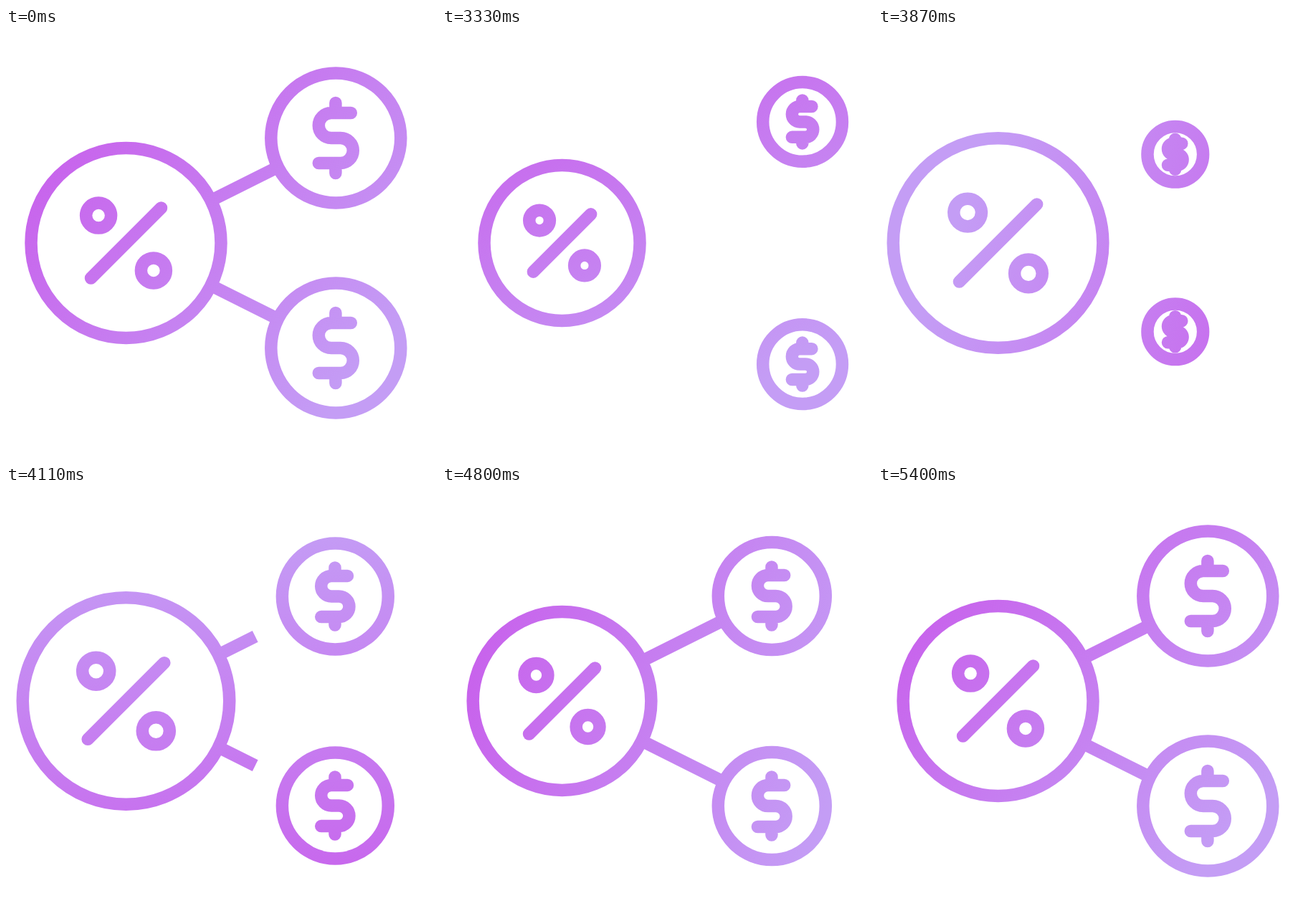
An HTML page without scripts that plays this animation: 600x600 px, repeating every 5.43 s.

```html
<!DOCTYPE html>
<html lang="en">
<head>
<meta charset="utf-8">
<title>Revenue share</title>
<style>
  html, body { margin: 0; width: 100%; height: 100%; overflow: hidden; background: #fff; }
  svg { display: block; width: 600px; height: 600px; background: #fff; isolation: isolate; }

  /* Shapes are black on white; the tint is screened over them. */
  .shape { fill: none; stroke: #000; stroke-width: 17.5; stroke-linecap: round; stroke-linejoin: round; }
  path, circle { vector-effect: non-scaling-stroke; }
  .disc { fill: #fff; }

  .top { --side: -1; }
  .bottom { --side: 1; }

  .hub, .coin, .link, .tint { animation: 5430ms linear infinite; }
  .hub { translate: 167.5px 300px; animation-name: pulse; }
  .leaving { animation-name: leave, vanish; }
  .arriving { animation-name: arrive, pop; }
  .link { stroke-linecap: butt; stroke-dasharray: 1 1; vector-effect: none; animation-name: connect; }
  .tint { mix-blend-mode: screen; transform-origin: 300px 300px; animation-name: spin, drift; }

  @keyframes pulse {
    0%, 55.25% { scale: 1; animation-timing-function: cubic-bezier(.33, 0, .67, 1); }
    65.56% { scale: .715; animation-timing-function: cubic-bezier(.33, 0, .5, 1); }
    73.3% { scale: 1.148; animation-timing-function: cubic-bezier(.42, 0, .67, 1); }
    80.85% { scale: .84; animation-timing-function: cubic-bezier(.33, 0, .67, 1); }
    93.92%, 100% { scale: 1; }
  }
  @keyframes leave {
    0%, 55.25% {
      translate: 460.3px calc(300px + var(--side) * 146.5px);
      animation-timing-function: cubic-bezier(.4, 0, .66, 1);
    }
    76.43%, 100% { translate: 715px calc(300px + var(--side) * 281px); }
  }
  @keyframes vanish {
    0%, 55.25% { scale: 1; animation-timing-function: cubic-bezier(.33, 0, .83, .8); }
    65.75% { scale: .137; }
    67.4%, 100% { scale: 0; }
  }
  @keyframes arrive {
    0%, 55.25% { translate: 167.5px 300px; animation-timing-function: cubic-bezier(.4, 0, .66, 1); }
    76.43%, 100% { translate: 460.3px calc(300px + var(--side) * 146.5px); }
  }
  @keyframes pop {
    0%, 69.8% { scale: .39; animation-timing-function: cubic-bezier(.33, 0, .67, 1); }
    80.66% { scale: 1.145; animation-timing-function: cubic-bezier(.33, 0, .67, 1); }
    88.95% { scale: .825; animation-timing-function: cubic-bezier(.33, 0, .67, 1); }
    99.45%, 100% { scale: 1; }
  }
  @keyframes connect {
    0%, 55.25% { stroke-dashoffset: .2; animation-timing-function: cubic-bezier(.33, 0, .67, 1); }
    62%, 72% { stroke-dashoffset: .7; animation-timing-function: cubic-bezier(.33, 0, .67, 1); }
    78.3%, 100% { stroke-dashoffset: .2; }
  }
  @keyframes spin {
    0%, 55.25% { rotate: 40deg; animation-timing-function: cubic-bezier(.33, 0, .38, 1); }
    99.45%, 100% { rotate: 400deg; }
  }
  @keyframes drift {
    0%, 55.25% { transform: none; animation-timing-function: ease-in-out; }
    70% { transform: translateX(-80px); animation-timing-function: ease-in-out; }
    80%, 100% { transform: none; }
  }
</style>
</head>
<body>
<svg viewBox="0 0 600 600" xmlns="http://www.w3.org/2000/svg">
  <defs>
    <linearGradient id="violet" gradientUnits="userSpaceOnUse" x1="30" y1="0" x2="570" y2="0">
      <stop offset="0" stop-color="#c862ec"/>
      <stop offset="1" stop-color="#c49df5"/>
    </linearGradient>
    <g id="coin">
      <circle class="disc" r="90.5"/>
      <path d="M21-35H-6.5a17.5 17.5 0 0 0 0 35H6.5a17.5 17.5 0 0 1 0 35H-24M-.4-49V-35M-.4 35V49"/>
    </g>
  </defs>

  <g class="shape">
    <path class="link" pathLength="1" d="M167.5 300L460.3 153.5"/>
    <path class="link" pathLength="1" d="M167.5 300L460.3 446.5"/>

    <g class="coin leaving top"><use href="#coin"/></g>
    <g class="coin leaving bottom"><use href="#coin"/></g>
    <g class="coin arriving top"><use href="#coin"/></g>
    <g class="coin arriving bottom"><use href="#coin"/></g>

    <g class="hub">
      <circle class="disc" r="132.5"/>
      <path d="M-49 49L49-49"/>
      <circle cx="-38.4" cy="-38.4" r="17.5"/>
      <circle cx="38.4" cy="38.4" r="17.5"/>
    </g>
  </g>

  <rect class="tint" x="-600" y="-600" width="1800" height="1800" fill="url(#violet)"/>
</svg>
</body>
</html>
```
